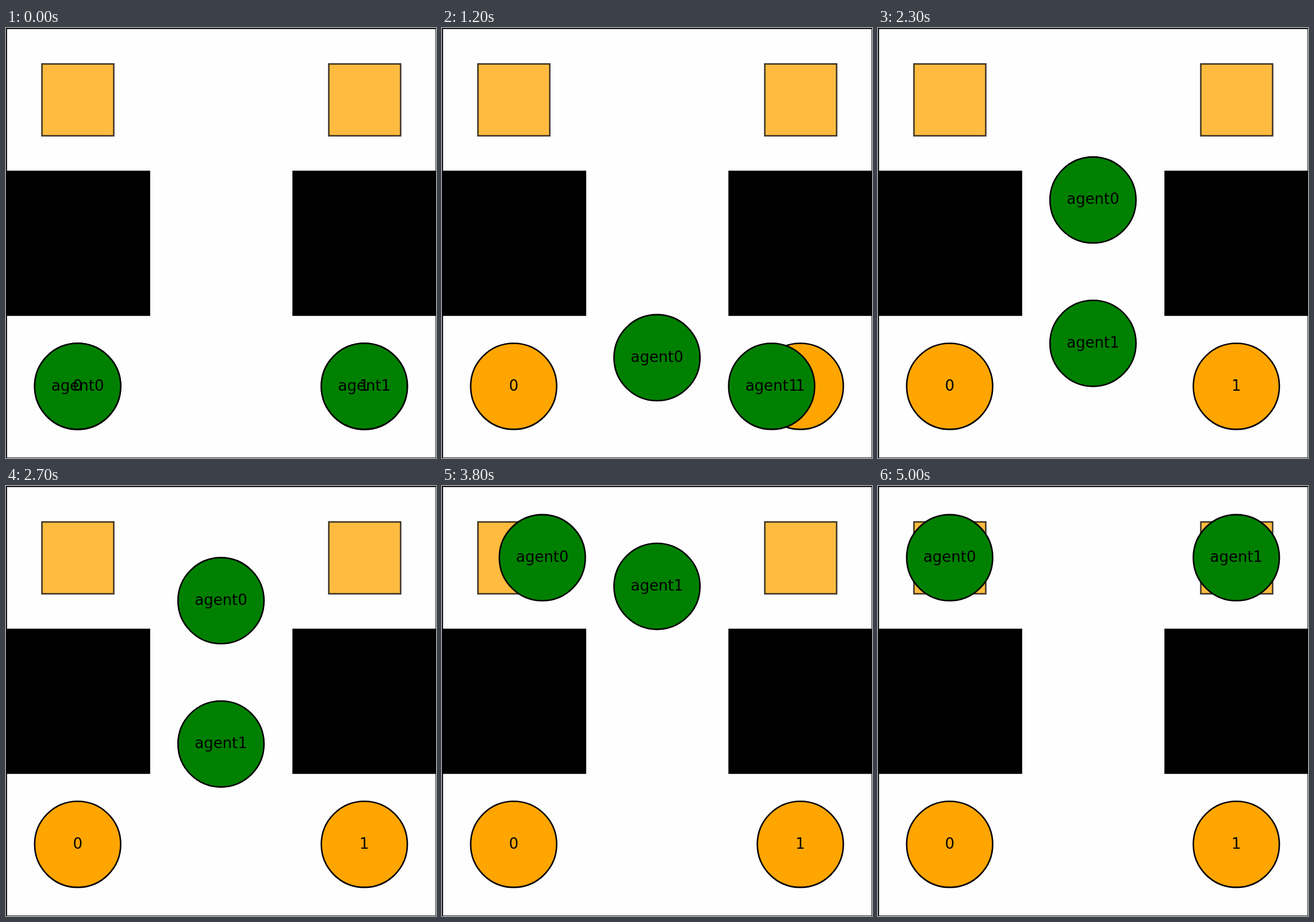
Write an HTML page with a canvas that moves like this. It is 748 by 748 pixels and loops after 6 s.

```html
<!DOCTYPE html>
<html lang="en">
<head>
<meta charset="utf-8">
<title>Two agents on a grid</title>
<style>
  html, body { margin: 0; width: 100%; height: 100%; overflow: hidden; background: #fefefe; }
  canvas { display: block; }
</style>
</head>
<body>
<canvas id="stage" width="748" height="748"></canvas>
<script>
const ctx = document.getElementById("stage").getContext("2d");
const SIZE = 748, CELL = SIZE / 3, STEP_MS = 100, LOOP_MS = 6000;

// Cell [column, row] reached after every ten steps.
const agents = [
  { name: "agent0", path: [[0, 2], [1, 2], [1, 1], [1, 0], [0, 0], [0, 0]] },
  { name: "agent1", path: [[2, 2], [2, 2], [1, 2], [1, 1], [1, 0], [2, 0]] },
];
const starts = agents.map((agent, i) => ({ name: String(i), cell: agent.path[0] }));
const center = v => (v + 0.5) * CELL;

function cellAt(path, step) {
  const leg = Math.min(Math.floor(step / 10), path.length - 2);
  const part = step / 10 - leg;
  return path[leg].map((v, axis) => v + (path[leg + 1][axis] - v) * part);
}

function box(x, y, w, h, fill) {
  ctx.fillStyle = fill;
  ctx.fillRect(x, y, w, h);
  ctx.strokeRect(x, y, w, h);
}

function disc([col, row], fill) {
  ctx.beginPath();
  ctx.arc(center(col), center(row), 0.3 * CELL, 0, 2 * Math.PI);
  ctx.fillStyle = fill;
  ctx.fill();
  ctx.stroke();
}

function label(text, [col, row]) {
  ctx.fillStyle = "#000";
  ctx.fillText(text, center(col), Math.round(center(row) + 7.2));
}

function draw() {
  const time = performance.now() % LOOP_MS;
  const step = Math.min(Math.floor(time / STEP_MS), 50);
  const movers = agents.map(({ name, path }) => ({ name, cell: cellAt(path, step) }));

  ctx.lineWidth = 2.6;
  ctx.strokeStyle = "#000";
  ctx.font = '25.97px "DejaVu Sans", sans-serif';
  ctx.textAlign = "center";

  box(0.5, 0.5, SIZE, SIZE, "#fefefe");
  box(0.5, 249.5, 249, 250, "#000");
  box(499.5, 249.5, 249, 250, "#000");

  ctx.globalAlpha = 0.75;
  for (const x of [62.5, 561.5]) box(x, 62.5, 125, 125, "#ffa500");
  ctx.globalAlpha = 1;

  for (const { cell } of starts) disc(cell, "#ffa500");
  for (const { cell } of movers) disc(cell, "#008000");
  for (const { name, cell } of [...starts, ...movers]) label(name, cell);

  requestAnimationFrame(draw);
}
draw();
</script>
</body>
</html>
```
